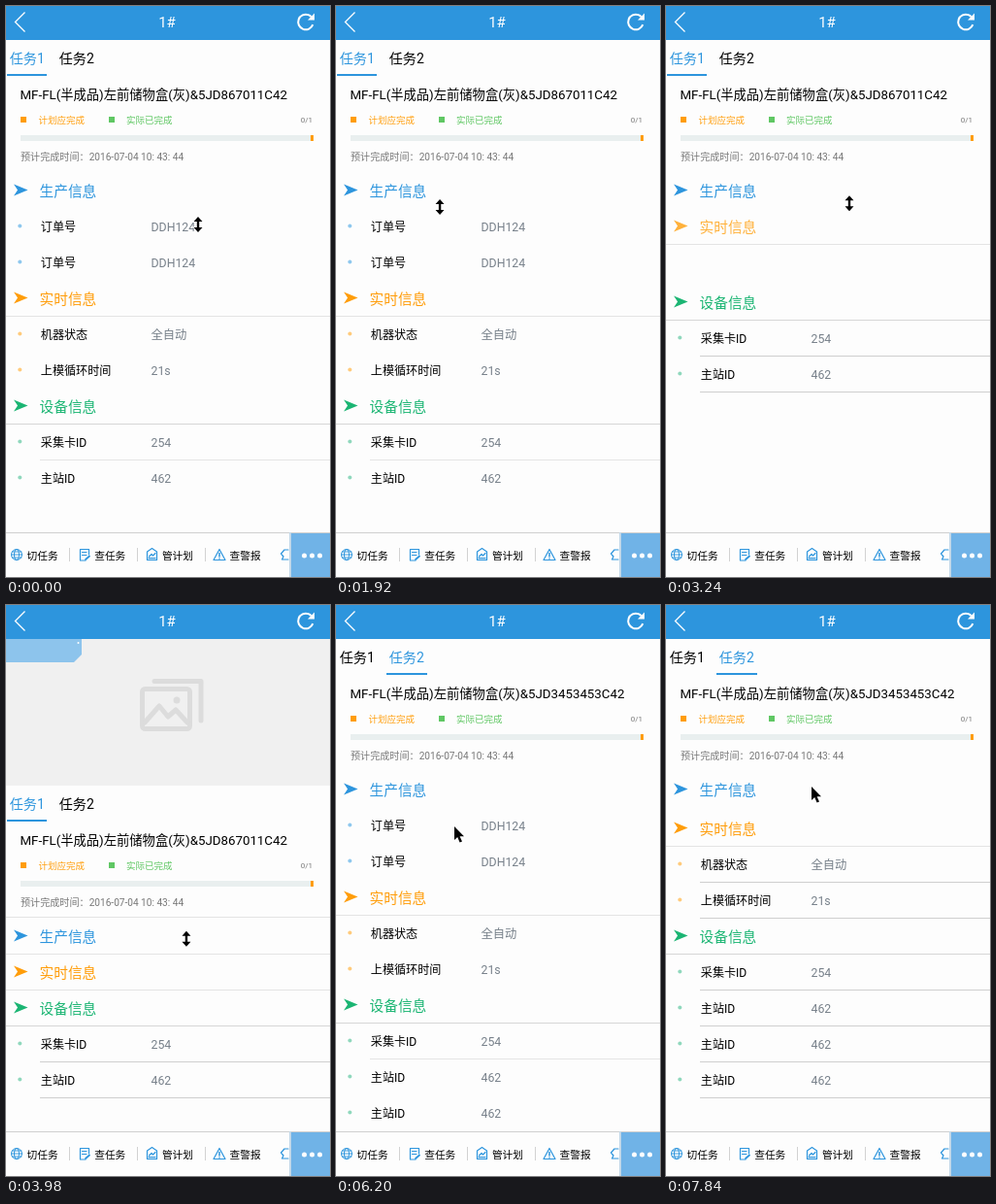
Write an HTML page with a canvas that moves like this. It is 334 px wide and 588 px high and loops after 7.99 s.

```html
<!DOCTYPE html>
<html lang="zh-CN">
<head>
<meta charset="utf-8">
<style>
html, body { margin: 0; width: 100%; height: 100%; overflow: hidden; background: #fdfdfd; }
canvas { display: block; width: 334px; height: 588px; }
</style>
</head>
<body>
<canvas id="stage"></canvas>
<script>
const W = 334, H = 588, LOOP = 7990, STEP = 147.9, LAST = 53;
const BLUE = '#2d95dd', ORANGE = '#ff9d0a', GREEN = '#5fc763', TEAL = '#1bb573';
const PAPER = '#fdfdfd', GREY = '#dcdcdc', RULE = '#cfcfcf', PALE = '#e4e4e4';
const HEADER = 35, BANNER = 151, ROW = 37, FOOTER = 542;
const SWITCH = 4640, FOLD = 300;
const SANS = 'Roboto, "Noto Sans CJK SC", "Noto Sans CJK", sans-serif';
const SANS_WIDE = 'Roboto, "Noto Sans CJK TC", "Noto Sans CJK", sans-serif';
const canvas = document.getElementById('stage');
const c = canvas.getContext('2d');
const ratio = window.devicePixelRatio || 1;
canvas.width = W * ratio;
canvas.height = H * ratio;

const order = ['订单号', 'DDH124'], host = ['主站ID', '462'], card = ['采集卡ID', '254'];
const live = [['机器状态', '全自动'], ['上模循环时间', '21s']];
const heads = [
  { name: '生产信息', color: BLUE, dot: '#8fc8ee' },
  { name: '实时信息', color: ORANGE, dot: '#ffcb7c' },
  { name: '设备信息', color: TEAL, dot: '#90d8bd' }
];
// taps: when each section is folded, then unfolded.
const tasks = [
  {
    title: 'MF-FL(半成品)左前储物盒(灰)&5JD867011C42',
    rows: [[order, order], live, [card, host]],
    taps: [[2500], [3114], []]
  },
  {
    title: 'MF-FL(半成品)左前储物盒(灰)&5JD3453453C42',
    rows: [[order, order], live, [card, host, host, host]],
    taps: [[6500, 7800], [6850, 7240], []]
  }
];
// Places the pointer glides between: time, x, y.
const stops = [[150, 198, 225], [500, 190, 276], [1900, 107, 207], [3240, 189, 203],
  [3930, 187, 346], [5030, 56, 82], [5450, 311, 5], [6210, 122, 228], [7550, 150, 147], [7830, 150, 187]];

// Smooth rise from 0 to 1.
function ramp(t, start, length) {
  const p = Math.min(1, Math.max(0, (t - start) / length));
  return (1 - Math.cos(Math.PI * p)) / 2;
}

// Rise at one time, fall at another.
const pull = (t, down, up, length) => ramp(t, down, length) - ramp(t, up, length);

const openness = (taps, t) =>
  taps.reduce((sum, tap, k) => sum + (k % 2 ? 1 : -1) * ramp(t, tap, FOLD), 1);

const scrollAt = t =>
  BANNER * (1 - pull(t, 1320, 1600, 280) - pull(t, 3430, 4050, 420)) - 50 * pull(t, 150, 800, 350);

const pointerAt = (t, axis) => stops.slice(1).reduce((v, stop, k) => {
  const from = stops[k];
  return v + (stop[axis] - from[axis]) * ramp(t, from[0], stop[0] - from[0]);
}, stops[0][axis]);

function rect(x, y, w, h, color) {
  c.fillStyle = color;
  c.fillRect(x, y, w, h);
}

function text(s, x, mid, size, color, align = 'left', font = SANS) {
  c.font = size + 'px ' + font;
  c.textAlign = align;
  c.fillStyle = color;
  c.fillText(s, x, Math.round(mid + size * 0.38));
}

function path(points, close) {
  c.beginPath();
  points.forEach(([x, y]) => c.lineTo(x, y));
  if (close) c.closePath();
}

function fillPoly(points, color) {
  path(points, true);
  c.fillStyle = color;
  c.fill();
}

function strokePath(color, width) {
  c.strokeStyle = color;
  c.lineWidth = width;
  c.stroke();
}

function stroke(points, color, width, close) {
  path(points, close);
  strokePath(color, width);
}

function dot(x, y, r, color) {
  c.beginPath();
  c.arc(x, y, r, 0, 7);
  c.fillStyle = color;
  c.fill();
}

function drawBanner(y) {
  rect(0, y, W, BANNER, '#f0f0f0');
  c.save();
  c.translate(0, y);
  c.lineJoin = c.lineCap = 'round';
  stroke([[153, 43.5], [201, 43.5], [201, 84]], GREY, 5);
  c.beginPath();
  c.roundRect(140.5, 51.5, 49, 41, 3);
  strokePath(GREY, 5);
  stroke([[143, 86], [158, 69], [167, 80], [175, 73], [187, 86]], GREY, 5);
  dot(176, 63, 3.5, GREY);
  fillPoly([[0, 0], [78, 0], [78, 16], [70, 24], [0, 24]], '#8dc4ec');
  dot(74.5, 4, 1, '#fff');
  c.restore();
}

function drawTabs(y, active) {
  rect(0, y, W, 38, PAPER);
  [4, 55].forEach((x, i) => text('任务' + (i + 1), x - 0.3, y + 18.5, 14.1, i === active ? BLUE : '#000'));
  rect(active ? 52 : 1, y + 35, active ? 42 : 41, 2, BLUE);
}

function drawSummary(task, y) {
  text(task.title, 14.5, y + 56, 13.3, '#000');
  rect(15, y + 79, 6, 6, ORANGE);
  text('计划应完成', 33.5, y + 82, 9.5, ORANGE);
  rect(106, y + 79, 6, 6, GREEN);
  text('实际已完成', 124, y + 82, 9.5, GREEN);
  text('0/1', 316, y + 82, 8, '#777', 'right');
  rect(15, y + 98, 302, 6, '#e9efef');
  rect(314, y + 98, 3, 6, ORANGE);
  text('预计完成时间：2016-07-04 10: 43: 44', 15, y + 120, 10.1, '#777', 'left', SANS_WIDE);
}

const hairline = (x, y, color) => rect(x, Math.round(y), W - x, 1, color);

function drawRow([label, value], y, color) {
  dot(14.3, y - 0.5, 2, color);
  text(label, 35.8, y, 12.1, '#000');
  text(value, 149.5, y, 12.3, '#77808a');
}

function drawList(task, y, t, docked) {
  // A full list shows only its main dividers.
  const full = openness(task.taps[0], t) === 1;
  if (!docked) hairline(0, y - 20, PALE);
  heads.forEach((head, i) => {
    const open = openness(task.taps[i], t);
    const rows = task.rows[i];
    c.save();
    if (open > 0 && open < 1 && t < task.taps[i][0] + FOLD) c.globalAlpha *= 0.8;
    fillPoly([[8, y - 6.5], [22.5, y - 0.5], [8, y + 5.5], [12, y - 0.5]], head.color);
    text(head.name, 34.5, y, 14.7, head.color);
    c.restore();
    if (i || !docked) hairline(0, y + 18, i === 2 ? '#d6d6d6' : PALE);
    if (open === 1) rows.forEach((row, k) => {
      const mid = y + ROW * (k + 1);
      drawRow(row, mid, head.dot);
      if (!full || (i === 2 && k === 0)) hairline(35, mid + 18, full ? PALE : RULE);
    });
    y += ROW + rows.length * ROW * open;
  });
}

function drawHeader() {
  rect(0, 0, W, HEADER, BLUE);
  c.lineJoin = 'miter';
  c.lineCap = 'butt';
  stroke([[19.5, 6.5], [9.5, 16.5], [19.5, 26.5]], '#fff', 1.3);
  text('1#', 166, 16, 15, '#fff', 'center');
  c.beginPath();
  c.arc(309, 16.5, 7.8, 0.35, 5.5);
  strokePath('#fff', 2);
  fillPoly([[318, 7.5], [318, 14.5], [311, 14.5]], '#fff');
}

function drawIcons() {
  c.lineJoin = c.lineCap = 'round';
  const line = (points, width = 1.2, close = false) => stroke(points, BLUE, width, close);
  [5.5, 2.5].forEach(rx => {
    c.beginPath();
    c.ellipse(11, 565, rx, 5.5, 0, 0, 7);
    strokePath(BLUE, 1);
  });
  [562, 565, 568].forEach(y => line([[6, y], [16, y]], 0.9));
  line([[82, 571], [76.5, 571], [76.5, 559.5], [85.5, 559.5], [85.5, 565]]);
  [562.5, 565.5].forEach(y => line([[78.5, y], [83, y]]));
  line([[82, 570], [86, 566.5]], 1.8);
  line([[145.5, 562], [150.5, 558.5], [155.5, 562], [155.5, 570.5], [145.5, 570.5]], 1.2, true);
  line([[147.5, 567], [150, 564.5], [151.5, 566], [154, 563.5]]);
  line([[147, 568.7], [154, 568.7]]);
  line([[220, 559.5], [226, 570.5], [214, 570.5]], 1.2, true);
  line([[220, 563.5], [220, 567]], 1.5);
  dot(220, 569, 0.8, BLUE);
  line([[291, 560], [287, 560], [283.5, 564], [286, 567], [284.5, 570], [291, 570]]);
}

function drawFooter() {
  rect(0, FOOTER, W, H - FOOTER, PAPER);
  hairline(0, FOOTER, RULE);
  ['切任务', '查任务', '管计划', '查警报'].forEach((s, i) => {
    text(s, 21.5 + 69.7 * i, 565.5, 10.7, '#000');
    if (i < 3) rect(65 + 70 * i, 558, 1, 14, '#d2d2d2');
  });
  drawIcons();
  rect(292, FOOTER, 2, 46, '#c4d9e9');
  rect(294, FOOTER + 1, 40, 45, '#70b3e7');
  [0, 1, 2].forEach(i => dot(307.5 + 8 * i, 566, 2.5, '#fff'));
}

function drawPointer(t) {
  const half = [[0, -8], [4.5, -3], [1.2, -3], [1.2, 3], [4.5, 3]];
  const resize = [...half, ...half.map(([x, y]) => [-x, -y])];
  const arrow = [[0, 0], [0, 14], [3.2, 11], [5.6, 16.5], [8, 15.5], [5.6, 10.2], [10, 10.2]];
  const shape = t < SWITCH ? resize : arrow;
  c.save();
  c.translate(pointerAt(t, 1), pointerAt(t, 2));
  c.lineJoin = 'miter';
  stroke(shape, '#fff', 1.6, true);
  fillPoly(shape, '#000');
  c.restore();
}

function draw(t) {
  c.setTransform(ratio, 0, 0, ratio, 0, 0);
  rect(0, 0, W, H, PAPER);
  const scroll = Math.round(scrollAt(t));
  const top = HEADER + BANNER - scroll;
  const active = t < SWITCH ? 0 : 1;
  const task = tasks[active];
  drawBanner(HEADER - scroll);
  drawTabs(top, active);
  c.save();
  if (active) c.globalAlpha = Math.min(1, 0.4 + (t - SWITCH) / 350);
  drawSummary(task, top);
  drawList(task, top + 155, t, scroll === BANNER);
  c.restore();
  drawHeader();
  drawFooter();
  drawPointer(t);
}

const start = performance.now();
function tick() {
  const t = (performance.now() - start) % LOOP;
  // The screen updates about seven times a second.
  draw(Math.min(LAST, Math.floor((t + 10) / 147.4)) * STEP);
  requestAnimationFrame(tick);
}
tick();
</script>
</body>
</html>
```
